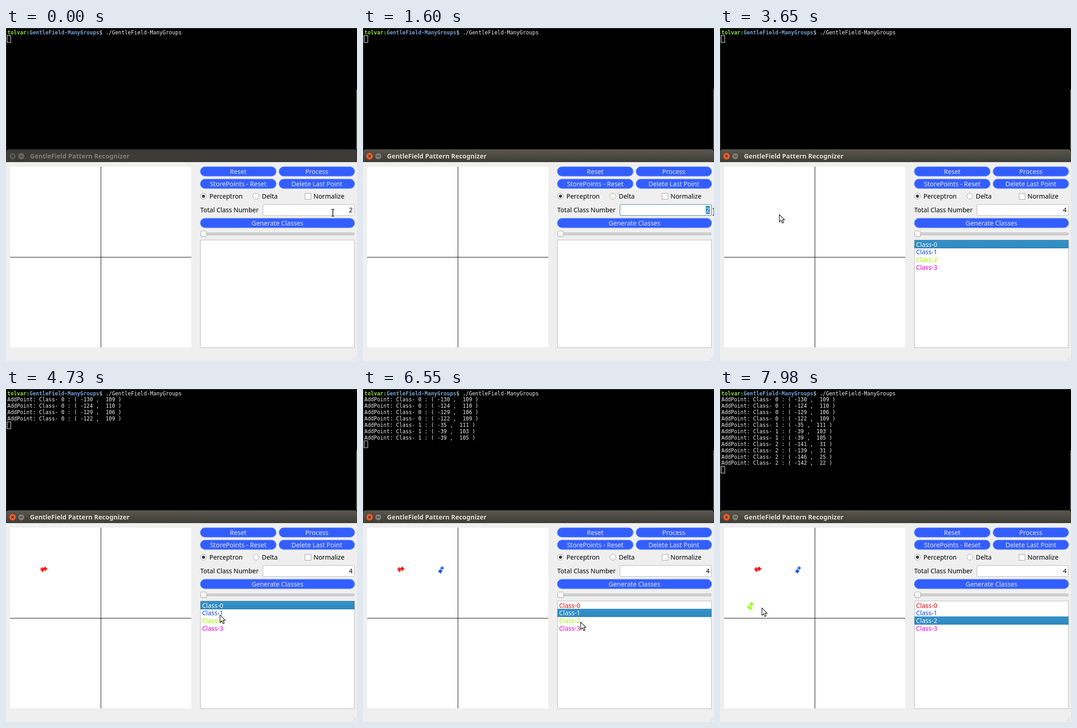
Write an HTML page that moves like this. It is 767 px wide and 730 px high and loops after 8000 ms.

```html
<!DOCTYPE html>
<html lang="en">
<head>
<meta charset="utf-8">
<title>Point sorter</title>
<style>
  html, body { margin: 0; width: 100%; height: 100%; overflow: hidden; background: #000; }
  svg { display: block; width: 767px; height: 730px; }
  text { font: 14px "Noto Sans", "Open Sans", sans-serif; fill: #000; white-space: pre; }
  .term text { font: 11.51px "DejaVu Sans Mono", monospace; fill: #eee; }
  .term .user { font-weight: bold; fill: #8ae234; }
  .term .path { font-weight: bold; fill: #729fcf; }
  .title { font-weight: bold; fill: #807d78; }
  .btn rect { fill: #335eff; stroke: #4d76ff; stroke-width: 1.5; }
  .btn text { fill: #e2e6f2; text-anchor: middle; }
  .btn.hover rect { fill: #3d67ff; }
  .btn.down rect { fill: #2a50dd; }
  .box { fill: #fff; stroke: #b4b4b4; }
  .axis { fill: #000; shape-rendering: crispEdges; }
  .active .title { fill: #dfdbd2; }
  .active #bar { fill: url(#barOn); }
  .active .close { fill: #e4602f; stroke: #8e3a1c; }
  .active .mini { fill: #7d7a72; }
  .focus #field { stroke: #2f78a8; }
  .end { text-anchor: end; }
</style>
</head>
<body>
<svg id="stage" viewBox="0 0 767 730">
  <defs>
    <linearGradient id="barOn" x2="0" y2="1">
      <stop stop-color="#5a574f"/><stop offset="1" stop-color="#3d3c37"/>
    </linearGradient>
    <linearGradient id="rowFill" x2="0" y2="1">
      <stop stop-color="#3194cb"/><stop offset="1" stop-color="#2f88bf"/>
    </linearGradient>
    <linearGradient id="knobFill" x2="0" y2="1">
      <stop stop-color="#fff"/><stop offset="1" stop-color="#eee"/>
    </linearGradient>
  </defs>

  <g class="term">
    <rect width="767" height="296"/>
    <rect width="767" height="1.5" fill="#2d2c2a"/>
    <rect width="1.5" height="268" fill="#2d2c2a"/>
    <rect x="766" y="134" width="1" height="132" fill="#b0aea9"/>
    <text x="3" y="13.5"><tspan class="user">tolvar:</tspan><tspan class="path">GentleField-ManyGroups</tspan>$ ./GentleField-ManyGroups</text>
    <g id="log"></g>
    <rect id="caret" x="2.5" width="8" height="15" fill="none" stroke="#eee"/>
  </g>

  <path id="bar" d="M0 295V272Q0 266 6 266H761Q767 266 767 272V295Z" fill="#3c3b37"/>
  <circle class="close" cx="14.3" cy="281" r="7.5" fill="#595853" stroke="#32312e"/>
  <path d="M11.8 278.5l5 5m0-5l-5 5" stroke="#3a2a24" stroke-width="1.3"/>
  <circle class="mini" cx="33.3" cy="281" r="7.5" fill="#66645e" stroke="#32312e"/>
  <path d="M30 281h6.6" stroke="#32312e" stroke-width="1.4"/>
  <text class="title" x="52.5" y="286">GentleField Pattern Recognizer</text>

  <rect y="294" width="767" height="436" fill="#efefef"/>
  <rect x="9" y="304" width="396" height="396" fill="#fff"/>
  <rect class="axis" x="207" y="304" width="1" height="396"/>
  <rect class="axis" x="9" y="502" width="396" height="1"/>
  <g id="points" fill="none" stroke-width="2"></g>

  <g id="buttons"></g>

  <g fill="#fff" stroke="#a0a0a0">
    <circle cx="431.5" cy="368.7" r="6.5"/>
    <circle cx="546" cy="368.7" r="6.5"/>
    <rect x="653.5" y="362.5" width="13" height="13"/>
  </g>
  <circle cx="431.5" cy="368.7" r="3.4" fill="#3c3c3c"/>
  <text x="444.5" y="374">Perceptron</text>
  <text x="559" y="374">Delta</text>
  <text x="672" y="374">Normalize</text>

  <text x="424.5" y="404">Total Class Number</text>
  <rect id="field" class="box" x="561.5" y="387" width="200" height="24" rx="2"/>
  <rect id="pick" x="749" y="390" width="9" height="17.5" fill="#308cc6"/>
  <text id="count" class="end" x="757.5" y="404"></text>

  <rect x="425.5" y="449.2" width="335.5" height="4.3" rx="2" fill="#d8d8d8" stroke="#a8a8a8"/>
  <rect x="425.5" y="445" width="13" height="12.5" rx="2.5" fill="url(#knobFill)" stroke="#a6a6a6"/>

  <rect class="box" x="425" y="464.8" width="336.5" height="236"/>
  <rect id="row" x="425.5" width="335.5" height="16.8" fill="url(#rowFill)" stroke="#2672a3"/>
  <g id="list"></g>
  <path d="M757 727.5h9M760 724.5h6M763 721.5h3" stroke="#bcbcbc" stroke-width="1.2" stroke-dasharray="1.2 1.8"/>

  <path id="arrow" d="M.6 .8V17.2L4.5 13.6L7.2 19.8L10 18.6L7.3 12.6H12.2Z" fill="#fff" stroke="#111" stroke-width="1.2" stroke-linejoin="round"/>
  <g id="beam" fill="none">
    <path d="M-3-7.5H3M0-7.5V7.5M-3 7.5H3" stroke="#fff" stroke-width="3.4"/>
    <path d="M-3-7.5H-1L0-6.7L1-7.5H3M0-7V7M-3 7.5H-1L0 6.7L1 7.5H3" stroke="#111" stroke-width="1.6"/>
  </g>
</svg>
<script>
const LOOP = 8000, PITCH = 13.9, REFRESH = 100;
const $ = id => document.getElementById(id);

function add(parent, tag, attrs, text) {
  const el = document.createElementNS("http://www.w3.org/2000/svg", tag);
  for (const key in attrs) el.setAttribute(key, attrs[key]);
  if (text) el.textContent = text;
  return parent.appendChild(el);
}

function button(x, y, w, label) {
  const g = add($("buttons"), "g", { class: "btn" });
  add(g, "rect", { x: x + .5, y: y + .5, width: w - 1, height: 20, rx: 10 });
  add(g, "text", { x: x + w / 2, y: y + 15.7 }, label);
  return g;
}
button(424.5, 304, 166, "Reset");
button(596.5, 304, 165.5, "Process");
button(424.5, 331, 166, "StorePoints - Reset");
button(596.5, 331, 165.5, "Delete Last Point");
const generate = button(424.5, 417, 337.5, "Generate Classes");

const inks = ["#f00", "#0040f0", "#8cff00"];
const labelInks = ["#ee0000", "#0a40e6", "#a0f000", "#e800dc"];
const rowTop = i => 465.6 + 16.8 * i;
const labels = labelInks.map((fill, i) =>
  add($("list"), "text", { x: 428.5, y: rowTop(i) + 13.9 }, "Class-" + i));

// One cluster per class: row picked, first click, time between clicks
const clusters = [
  { picked: 3100, at: 3900, gap: 97, points: [[-130, 109], [-124, 110], [-129, 106], [-122, 109]] },
  { picked: 5000, at: 5620, gap: 190, points: [[-35, 111], [-39, 103], [-39, 105]] },
  { picked: 6680, at: 7580, gap: 100, points: [[-141, 31], [-139, 31], [-146, 25], [-142, 22]] }
];
const toX = x => 207.5 + .99 * x;
const toY = y => 502.5 - .99 * y;
const clicks = clusters.flatMap(({ at, gap, points }, cls) =>
  points.map(([x, y], i) => ({ t: at + gap * i, cls, x, y })));

clicks.forEach((c, i) => {
  c.mark = add($("points"), "path", { d: `M${toX(c.x) - 4} ${toY(c.y)}h8m-4-4v8`, stroke: inks[c.cls] });
  c.line = add($("log"), "text", { x: 3, y: 13.5 + PITCH * (i + 1) },
    `AddPoint: Class- ${c.cls} : ( ${c.x} ,  ${c.y} )`);
});

// Pointer glides; every click also pulls the pointer to its point
const glide = (from, to, x, y) => ({ from, to, x, y });
const reach = (from, to, cls) => {
  const [x, y] = clusters[cls].points[0];
  return glide(from, to, toX(x), toY(y));
};
const glides = [
  glide(0, 0, 714.3, 405),
  glide(280, 400, 717, 399),
  glide(1150, 1150, 760, 402),
  glide(1600, 1600, 767, 403),
  glide(1680, 1780, 755, 400),
  glide(1930, 2030, 700, 425),
  glide(2460, 2650, 651, 413),
  glide(2750, 2930, 526, 481),
  glide(3200, 3650, 129, 408),
  reach(3750, 3750, 0),
  glide(4280, 4380, 109, 397),
  glide(4550, 4730, 467, 494.5),
  glide(4900, 4900, 466, 487),
  reach(5180, 5510, 1),
  glide(6110, 6550, 475, 510),
  reach(6880, 7400, 2),
  glide(7980, 7980, 91, 479),
  ...clicks.map(c => glide(c.t, c.t, toX(c.x), toY(c.y)))
].sort((a, b) => a.from - b.from);

// Eased travel, seen only at each screen refresh
function progress({ from, to }, t) {
  const count = Math.round((to - from) / REFRESH) + 1;
  if (t >= to) return 1;
  const p = (Math.floor((t - from) / (to - from) * (count - 1)) + 1) / count;
  return p * p * (3 - 2 * p);
}

function pointer(t) {
  const i = glides.findLastIndex(g => t >= g.from);
  const end = glides[i], start = glides[Math.max(i - 1, 0)];
  const p = progress(end, t);
  return [start.x + (end.x - start.x) * p, start.y + (end.y - start.y) * p];
}

const show = (el, on) => el.setAttribute("visibility", on ? "visible" : "hidden");

function draw(t) {
  const within = (a, b) => t >= a && t < b;
  const isArrow = t >= 1930;
  const [x, y] = pointer(t);
  show($("arrow"), isArrow);
  show($("beam"), !isArrow);
  $(isArrow ? "arrow" : "beam").setAttribute("transform", `translate(${x} ${y})`);

  $("stage").classList.toggle("active", t >= 1150);
  $("stage").classList.toggle("focus", within(1150, 2280));
  generate.classList.toggle("hover", isArrow && x > 425 && y > 417 && y < 438);
  generate.classList.toggle("down", within(2280, 2370));

  const picked = within(1230, 1680);
  show($("pick"), picked);
  $("count").textContent = t < 1680 ? "2" : "4";
  $("count").style.fill = picked ? "#fff" : "#000";

  const chosen = clusters.findLastIndex(c => t >= c.picked);
  show($("row"), chosen >= 0);
  $("row").setAttribute("y", rowTop(chosen));
  labels.forEach((el, i) => {
    show(el, t >= 2370);
    el.style.fill = i === chosen ? "#f4f8fb" : labelInks[i];
  });

  let lines = 1;
  for (const c of clicks) {
    const made = t >= c.t;
    show(c.mark, made);
    show(c.line, made);
    if (made) lines++;
  }
  $("caret").setAttribute("y", 2.6 + PITCH * lines);
}

const begin = performance.now();
function tick() {
  draw((performance.now() - begin) % LOOP);
  requestAnimationFrame(tick);
}
tick();
</script>
</body>
</html>
```
